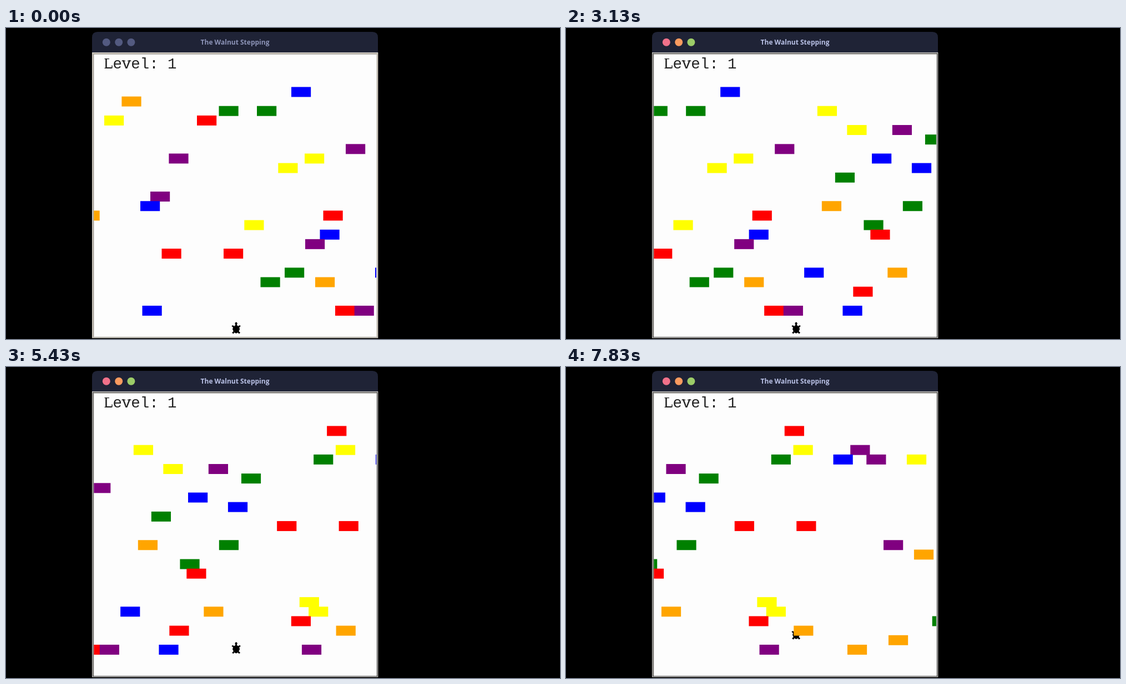
An HTML page that plays this animation: 998x561 px, repeating every 8000 ms.

```html
<!DOCTYPE html>
<html lang="en">
<head>
<meta charset="utf-8">
<title>Road game</title>
<style>
  html, body { margin: 0; width: 100%; height: 100%; overflow: hidden; background: #000; }
  svg { display: block; width: 100vw; height: 100vh; }
  .title { font: 700 12px "Open Sans", "Noto Sans", sans-serif; text-anchor: middle; }
  .level { font: 27.4px "Liberation Mono", "Courier New", monospace; fill: #222; white-space: pre; }
</style>
</head>
<body>
<svg viewBox="0 0 998 561">
  <defs>
    <clipPath id="field"><rect x="158.3" y="48" width="508.7" height="508.5"/></clipPath>
  </defs>
  <path d="M155 45V17q0-10 10-10h495q10 0 10 10v28z" fill="#1f2336"/>
  <g id="buttons">
    <circle cx="180.8" cy="25.7" r="7"/>
    <circle cx="203.2" cy="25.7" r="7"/>
    <circle cx="225.4" cy="25.7" r="7"/>
  </g>
  <text id="title" class="title" x="412.5" y="30">The Walnut Stepping</text>
  <rect x="155" y="44" width="515.3" height="515.3" fill="#d6d4d0"/>
  <rect id="edge" x="156.7" y="45.9" width="512" height="511.7" fill="#fdfdfd" stroke-width="1.2"/>
  <path d="M157.8 557V47H668" fill="none" stroke="#85817b"/>
  <path d="M158 557H667.6V47.5" fill="none" stroke="#d9d9d9"/>
  <g clip-path="url(#field)">
    <path id="turtle" stroke="#000" stroke-width="1" stroke-linejoin="round"/>
    <g id="cars"></g>
  </g>
  <text class="level" x="176" y="73">Level: 1</text>
  <path d="M177.5 55.6h8.5M177.5 72.4h4M191 72.4v-5M208.5 59.4h6.5m4 0h6.5" fill="none" stroke="#222" stroke-width="1.4"/>
</svg>
<script>
const LOOP = 8000, UNIT = 0.8577, STRIDE = 5 * UNIT, TICK = 43.6;
const FOCUS = 300, CLICK = 2500, RESUME = 2643;
const HOPS = { first: 4600, every: 250, count: 7 };
const COLORS = { r: '#ff0000', o: '#ffa500', y: '#ffff00', g: '#008000', b: '#0000ff', p: '#800080' };

// One entry per lane: colour letter and left edge at the start
const LANES = [
  'b514 r1037', 'o208.4', 'g383.5 g452 y688.7 y1052.8 p1155.5',
  'y177 r344 g1013 b1124.8 p1184.5 y1257.2', 'y742.2 p823.7', 'g882.8',
  'p612', 'p293.4 y538 b786.9', 'y490.3 b858.8', 'g720.7', 'r947 r1058.5',
  'p260', 'b242 o696.7 g842.7 p1215.3', 'o133.5 r571.5 o1270.2',
  'y429.3 g772.3', 'b565.5 r784.2', 'p539', 'r280.5 r392', 'y987.6',
  'g502 b665 o815.2 y1004', 'g458.5 o557 r972.7 g1303', 'r753.2 o1053.5',
  'o1224.2', 'b245.5 r593 p627.6 b734.3 p991.8 o1150.2'
];
// Right half of the turtle, head to tail
const HALF = [[0, 16], [2, 14], [1, 10], [4, 7], [7, 9], [9, 8], [6, 5], [7, 1],
  [5, -3], [8, -6], [6, -8], [4, -5], [0, -7]];

const $ = id => document.getElementById(id);
const clamp = (v, lo, hi) => Math.max(lo, Math.min(hi, v));

function addCar(spec, lane) {
  const el = document.createElementNS('http://www.w3.org/2000/svg', 'rect');
  const attrs = { y: 106.4 + lane * 20 * UNIT, width: 35.2, height: 18, fill: COLORS[spec[0]] };
  for (const key in attrs) el.setAttribute(key, attrs[key]);
  $('cars').append(el);
  return { el, x: +spec.slice(1) };
}

const cars = LANES.flatMap((lane, i) => lane.split(' ').map(spec => addCar(spec, i)));
const outline = [...HALF, ...HALF.slice(1, -1).reverse().map(([x, y]) => [-x, y])];
$('turtle').setAttribute('d', 'M' + outline.map(([x, y]) => `${x * UNIT} ${-y * UNIT}`).join('L') + 'z');

// The game ticks, freezes on a click, runs on and ends with the collision
function ticks(t) {
  return clamp(Math.floor(t / TICK), 0, 44) + clamp(Math.floor((t - RESUME) / TICK), 0, 106);
}

function render(t) {
  const shift = ticks(t) * STRIDE;
  for (const { el, x } of cars) el.setAttribute('x', (x - shift).toFixed(2));

  const hops = clamp(Math.floor((t - HOPS.first) / HOPS.every) + 1, 0, HOPS.count);
  $('turtle').setAttribute('transform', `translate(414.6 ${544.4 - hops * 10 * UNIT})`);

  const active = t >= FOCUS;
  const lights = active ? ['#f0718a', '#fb9b5f', '#9ccc68'] : ['#535a80', '#535a80', '#535a80'];
  [...$('buttons').children].forEach((dot, i) => dot.setAttribute('fill', lights[i]));
  $('title').setAttribute('fill', active ? '#b9c1e6' : '#8d94b8');
  $('edge').setAttribute('stroke', t >= CLICK ? '#3a3a3a' : '#b8ae9c');
}

const start = performance.now();
function frame() {
  render((performance.now() - start) % LOOP);
  requestAnimationFrame(frame);
}
frame();
</script>
</body>
</html>
```
